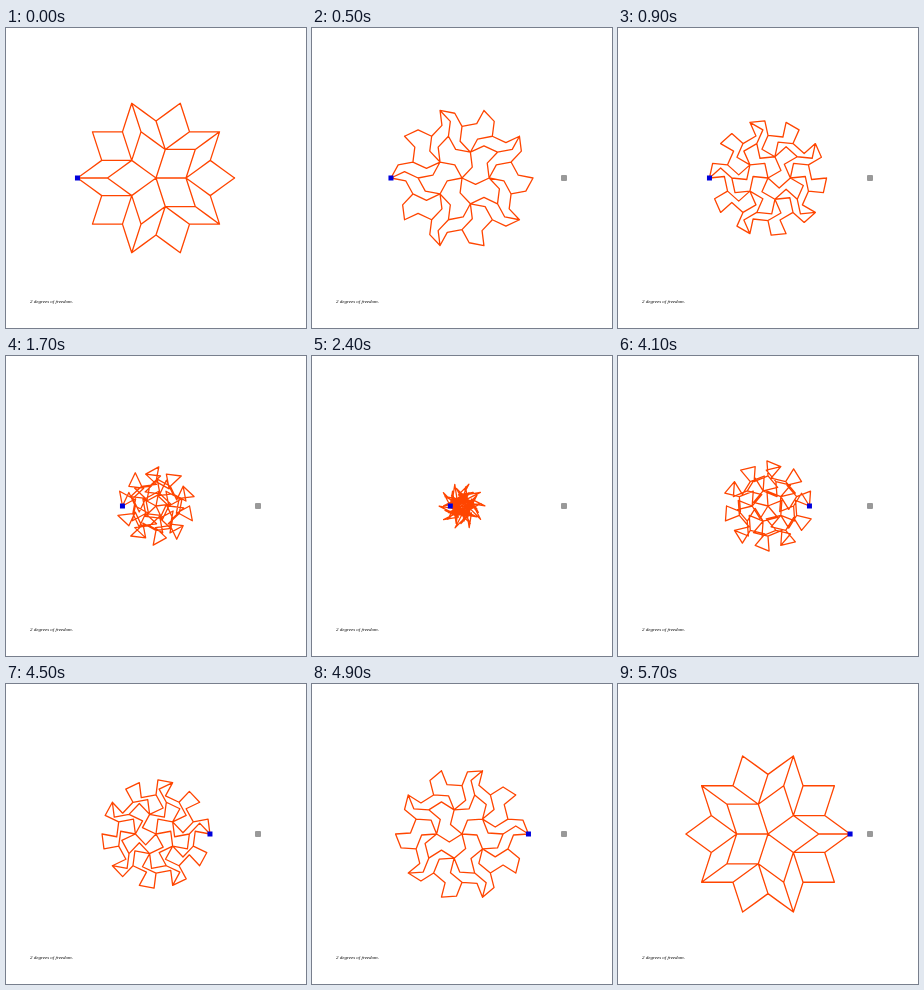
Write an HTML page that moves like this. It is 300x300 px and loops after 5.8 s.

```html
<!DOCTYPE html>
<html lang="en">
<head>
<meta charset="utf-8">
<title>Folding rhombus linkage</title>
<style>
  html, body { margin: 0; width: 100%; height: 100%; overflow: hidden; background: #fff; }
  svg { display: block; width: 300px; height: 300px; }
  #bars { fill: none; stroke: #ff4500; stroke-width: 1.3; stroke-linejoin: round; stroke-linecap: round; }
  text { font: italic 5px "Liberation Serif", "Times New Roman", serif; fill: #000; }
</style>
</head>
<body>
<svg viewBox="0 0 300 300">
  <path id="bars" transform="translate(150 150)"/>
  <rect id="anchor" x="249" y="147" width="6" height="6" rx="1" fill="#999"/>
  <rect id="handle" y="147.5" width="5" height="5" fill="#0000dc"/>
  <text x="24" y="275">2 degrees of freedom.</text>
</svg>
<script>
  const STEP = 100, STEPS = 58;
  const BAR = 15;                       // each edge is two bars joined by a hinge
  const PHI = (1 + Math.sqrt(5)) / 2;
  const REACH = PHI * PHI;              // tip distance in edge lengths
  const SPEED = 3.125, RAMP_IN = 5.2, RAMP_OUT = 6;

  const bars = document.getElementById('bars');
  const anchor = document.getElementById('anchor');
  const handle = document.getElementById('handle');

  const polar = (r, deg) => {
    const a = deg * Math.PI / 180;
    return [r * Math.cos(a), -r * Math.sin(a)];
  };
  const add = (p, q) => [p[0] + q[0], p[1] + q[1]];

  // Unit edges of the rhombus patch, each from an even vertex to an odd one.
  const edges = [];
  for (let a = 0; a < 360; a += 72) {
    const v = polar(1, a + 36);
    const p = polar(PHI, a), pNext = polar(PHI, a + 72);
    const q1 = add(v, polar(1, a)), q2 = add(v, polar(1, a + 72));
    const thin = polar(REACH, a), thinNext = polar(REACH, a + 72);
    const fat = polar(REACH, a + 36);
    for (const end of [[0, 0], p, pNext, q1, q2]) edges.push([v, end]);
    edges.push([thin, p], [thin, q1], [thinNext, q2], [fat, q1], [fat, q2]);
  }

  // Constant speed with a short ramp at both ends.
  function travel(k) {
    const start = k < RAMP_IN ? k * k / (2 * RAMP_IN) : k - RAMP_IN / 2;
    const late = Math.max(0, k - (STEPS - 1 - RAMP_OUT));
    return SPEED * (start - late * late / (2 * RAMP_OUT));
  }

  function draw(k) {
    const x = travel(k) - 2 * BAR * REACH;
    const s = x / REACH;
    const h = Math.sqrt(Math.max(0, BAR * BAR - s * s / 4));
    const at = (px, py) => px.toFixed(2) + ' ' + py.toFixed(2);
    bars.setAttribute('d', edges.map(([a, b]) => {
      const dx = b[0] - a[0], dy = b[1] - a[1];
      const hinge = at(s * (a[0] + b[0]) / 2 - h * dy, s * (a[1] + b[1]) / 2 + h * dx);
      return `M${at(s * a[0], s * a[1])}L${hinge}L${at(s * b[0], s * b[1])}`;
    }).join(''));
    handle.setAttribute('x', (147.5 + x).toFixed(2));
    anchor.setAttribute('visibility', k ? 'visible' : 'hidden');
  }

  const origin = performance.now();
  function tick() {
    const t = Math.max(0, performance.now() - origin);
    draw(Math.floor(t / STEP) % STEPS);
    requestAnimationFrame(tick);
  }
  tick();
</script>
</body>
</html>
```
